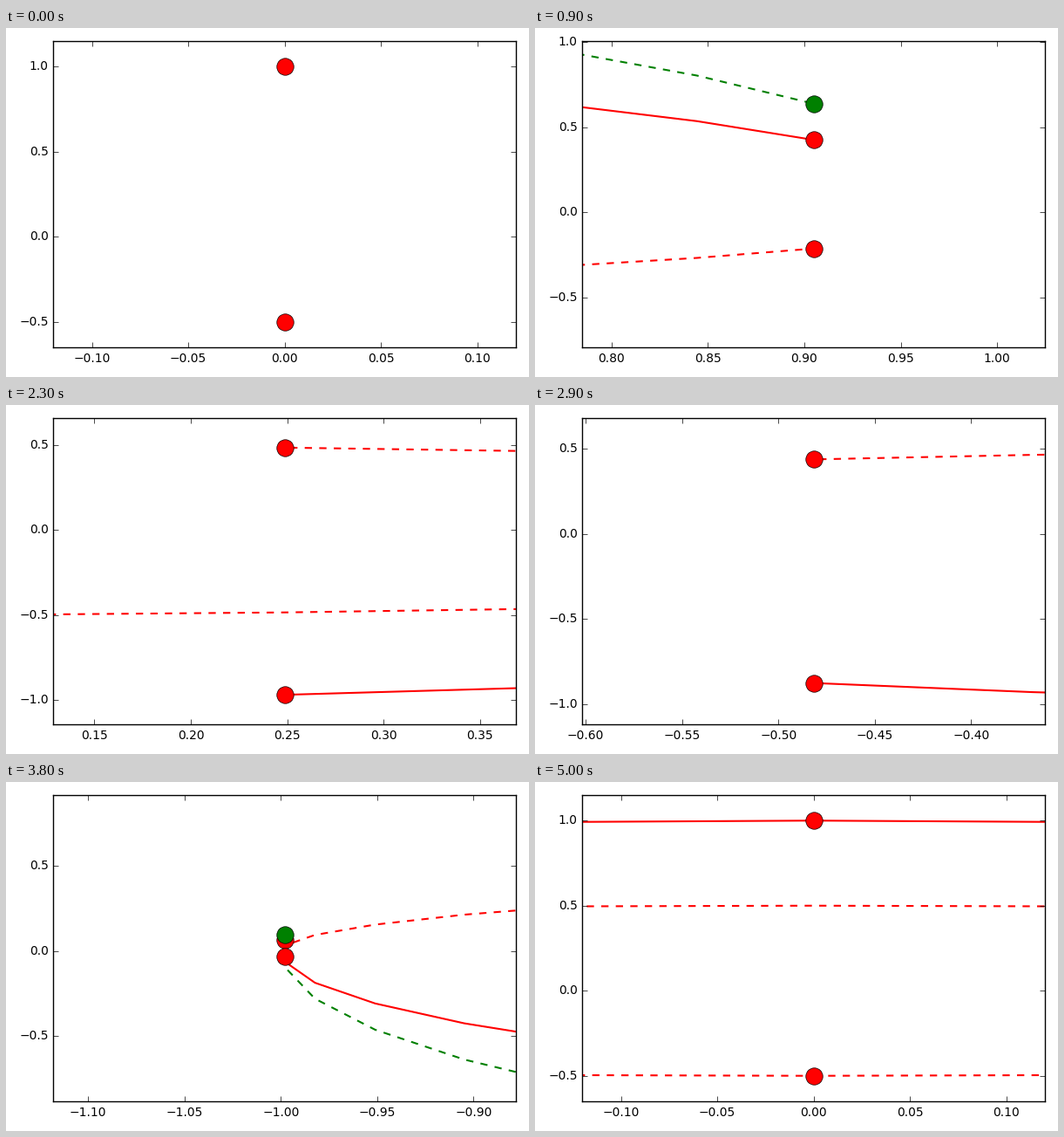
These frames come from a looping animation (600 px wide and 400 px high, 5.1 s). A matplotlib script:

```python
import numpy as np
import matplotlib.pyplot as plt
from matplotlib.animation import FuncAnimation
from matplotlib.ticker import MultipleLocator, StrMethodFormatter

WIDTH, HEIGHT, DPI = 600, 400, 100
FRAMES = 51
HALF_W, HALF_H = 0.12, 0.9

plt.style.use("classic")
plt.rcParams.update({
    "font.family": "DejaVu Sans",
    "font.size": 10,
    "figure.dpi": DPI,
    "savefig.dpi": DPI,
    "figure.facecolor": "white",
    "savefig.facecolor": "white",
})

# Two bodies about a shared centre, plus their separation
theta = np.linspace(0, 2 * np.pi, FRAMES)
x = np.sin(theta)
body_a = np.cos(theta)
body_b = -0.5 * body_a
gap = body_a - body_b
middle = (body_a + body_b) / 2

fig = plt.figure(figsize=(WIDTH / DPI, HEIGHT / DPI))
left, right, top, bottom = 54.3, 585, 15, 366
ax = fig.add_axes([left / WIDTH, 1 - bottom / HEIGHT,
                   (right - left) / WIDTH, (bottom - top) / HEIGHT])
ax.xaxis.set_major_locator(MultipleLocator(0.05))
ax.yaxis.set_major_locator(MultipleLocator(0.5))
ax.xaxis.set_major_formatter(StrMethodFormatter("{x:.2f}"))
ax.yaxis.set_major_formatter(StrMethodFormatter("{x:.1f}"))

paths = [(body_a, "r", "-"), (body_b, "r", "--"), (gap, "g", "--")]
trails = [ax.plot([], [], color=c, ls=style, lw=1.5)[0]
          for _, c, style in paths]
dots = [ax.plot([], [], "o", color=c, ms=14, mec="k", mew=0.5)[0]
        for _, c, _ in paths]


def update(i):
    for (y, _, _), trail, dot in zip(paths, trails, dots):
        trail.set_data(x[:i + 1], y[:i + 1])
        dot.set_data([x[i]], [y[i]])
    ax.set_xlim(x[i] - HALF_W, x[i] + HALF_W)
    ax.set_ylim(middle[i] - HALF_H, middle[i] + HALF_H)
    return trails + dots


anim = FuncAnimation(fig, update, frames=FRAMES, interval=100,
                     repeat=True, repeat_delay=0, blit=False)
plt.show()
```
